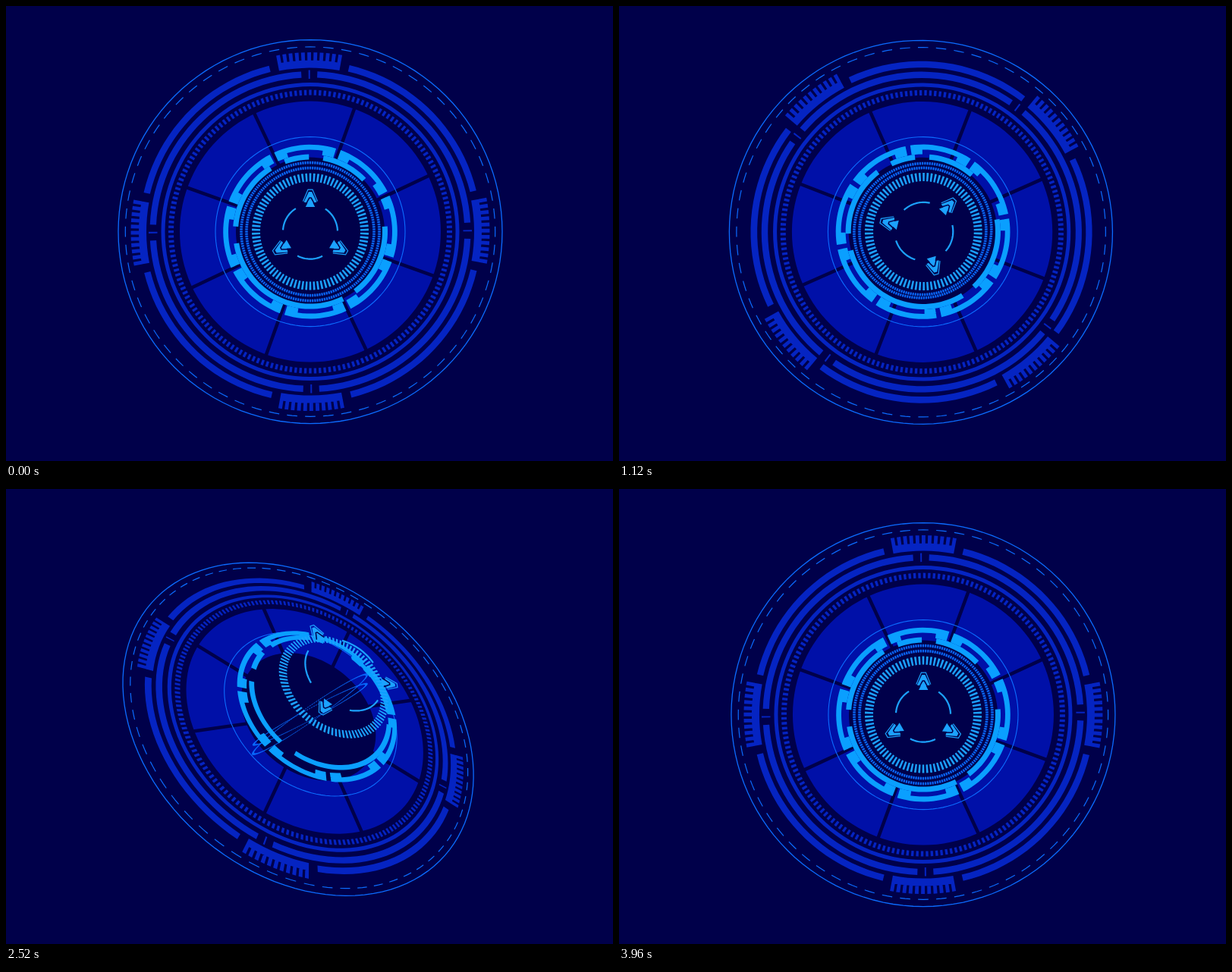
Animation, 800 px wide and 600 px high, one loop 4000 ms. Source, as an HTML page with a canvas:

```html
<!DOCTYPE html>
<html lang="en">
<head>
<meta charset="utf-8">
<title>Rotating dial</title>
<style>
html, body { margin: 0; width: 100%; height: 100%; overflow: hidden; background: #00004a; }
canvas { display: block; width: 800px; height: 600px; }
</style>
</head>
<body>
<canvas id="stage" width="800" height="600"></canvas>
<script>
const ctx = document.getElementById('stage').getContext('2d');
const LOOP = 4000, STEP = 40;
const CX = 401, CY = 297.6, DEPTH = 1300;
const BG = '#00004a', DISC = '#0010a8', BAND = '#0524c2', LINE = '#0c6cff',
      BRIGHT = '#0a9fff', TEETH = '#1ca2ff';
const RAD = Math.PI / 180;

// Key poses of the main turn: time, degrees
const TURN = [[0, 0], [1120, 51], [2040, 96.7], [2520, 118], [3120, 97.5], [LOOP, 0]];

// Smooth curve through the keys, at rest at both ends
function track(keys, t) {
  let i = 0;
  while (i < keys.length - 2 && t > keys[i + 1][0]) i++;
  const slope = k => k === 0 || k === keys.length - 1 ? 0
    : (keys[k + 1][1] - keys[k - 1][1]) / (keys[k + 1][0] - keys[k - 1][0]);
  const [t0, a] = keys[i], [t1, b] = keys[i + 1];
  const d = t1 - t0, u = (t - t0) / d, v = 1 - u;
  return a * (1 + 2 * u) * v * v + b * u * u * (3 - 2 * u)
    + d * u * v * (slope(i) * v - slope(i + 1) * u);
}

function ramp(t, from, to, power = 1) {
  const x = Math.max(0, Math.min(1, (t - from) / (to - from))) ** power;
  return x * x * (3 - 2 * x);
}

// Eases from 0 to 1, holds, and eases back
const hill = (t, up, top, leave, down = LOOP, power = 1) =>
  ramp(t, up, top, power) - ramp(t, leave, down);

// Maps a flat layer at height z through the tilt and the perspective
function plane(ax, ay, z = 0) {
  const ca = Math.cos(ax * RAD), sa = Math.sin(ax * RAD);
  const cb = Math.cos(ay * RAD), sb = Math.sin(ay * RAD);
  return (x, y) => {
    const py = y * ca - z * sa, pz = y * sa + z * ca;
    const s = DEPTH / (DEPTH + x * sb - pz * cb);
    return [CX + (x * cb + pz * sb) * s, CY + py * s];
  };
}

// Angles run clockwise from the top
const polar = (p, r, deg) => p(r * Math.sin(deg * RAD), -r * Math.cos(deg * RAD));

function poly(points, close = true) {
  points.forEach((q, i) => i ? ctx.lineTo(...q) : ctx.moveTo(...q));
  if (close) ctx.closePath();
}

function arcPoints(p, r, a, b) {
  const n = Math.max(1, Math.ceil(Math.abs(b - a) / 3));
  return Array.from({ length: n + 1 }, (_, i) => polar(p, r, a + (b - a) * i / n));
}

function band(p, r0, r1, a, b) {
  poly([...arcPoints(p, r1, a, b), ...arcPoints(p, r0, b, a)]);
}

function fill(color, draw) {
  ctx.beginPath();
  draw();
  ctx.fillStyle = color;
  ctx.fill();
}

function stroke(color, width, draw) {
  ctx.beginPath();
  draw();
  ctx.strokeStyle = color;
  ctx.lineWidth = width;
  ctx.stroke();
}

function circle(p, r, color, width) {
  stroke(color, width, () => poly(arcPoints(p, r, 0, 360)));
}

function ticks(p, r0, r1, n, duty, turn = 0) {
  const pitch = 360 / n;
  for (let i = 0; i < n; i++) {
    const a = turn + (i - duty / 2) * pitch;
    band(p, r0, r1, a, a + duty * pitch);
  }
}

function drawDial(p, turn, back) {
  circle(p, 253, LINE, 1.3);
  stroke(LINE, 1.2, () => {
    for (let a = 0; a < 360; a += 360 / 64) poly(arcPoints(p, 243.7, a - 1.6, a + 1.6), false);
  });
  fill(BAND, () => {
    for (let q = 0; q < 360; q += 90) {
      const a = turn + q - 0.35, b = back + q - 0.35;
      band(p, 216, 226, a - 10.6, a + 10.6);
      for (let i = -5; i <= 5; i++) band(p, 225.5, 236.5, a + i * 2 - 0.6, a + i * 2 + 0.6);
      band(p, 217, 225.5, a + 13.6, a + 76.4);
      band(p, 203.2, 211.5, b + 2.9, b + 87.1);
      band(p, 201.5, 213, b - 0.28, b + 0.28);
    }
    band(p, 191.5, 196.5, 0, 360);
    ticks(p, 180, 187, 180, 0.52, turn);
  });
  fill(DISC, () => band(p, 98, 172, 0, 360));
  stroke(BG, 4.5, () => {
    for (let q = 0; q < 360; q += 45) {
      const a = 19.7 + turn * 0.911 + q;
      poly([polar(p, 97, a), polar(p, 173.5, a)], false);
    }
  });
}

// Two thin tick rings that tumble on their own axes
function drawGyros(t) {
  const outer = plane(-55 * hill(t, 440, 2600, 3100), 80 * hill(t, 900, 2160, 2660));
  const inner = plane(-72 * hill(t, 700, 3100, 3100), 80 * hill(t, 900, 2160, 3120));
  const ring = (p, r, n) => {
    fill(LINE, () => ticks(p, r - 1.6, r + 1.6, n, 0.55));
    ctx.lineWidth = 0.4;
    ctx.strokeStyle = LINE;
    ctx.stroke();
  };
  ring(outer, 91, 180);
  ring(inner, 84, 168);
}

function drawBrackets(p, turn) {
  fill(BRIGHT, () => {
    for (let q = 0; q < 360; q += 45) {
      const a = turn + q + 20.5, b = a + 41.8;
      band(p, 108, 114.8, a, b);
      band(p, 102, 108.5, a, a + 8);
      band(p, 102, 108.5, b - 8.5, b);
    }
  });
}

function drawInnerArcs(p, turn) {
  fill(BRIGHT, () => {
    [[-20, -1], [10, 46], [86, 143], [154, 261], [274, 328]]
      .forEach(([a, b]) => band(p, 95, 102, turn + a, turn + b));
  });
}

function drawArrows(p, turn, spread) {
  stroke(TEETH, 2.2, () => {
    for (let q = 60; q < 360; q += 120) {
      poly(arcPoints(p, 36 * spread, turn + q - 26.5, turn + q + 28), false);
    }
  });
  const out = 44 * (spread - 1);
  for (let q = 0; q < 360; q += 120) {
    const c = Math.cos((turn + q) * RAD), s = Math.sin((turn + q) * RAD);
    // Points are mirrored: [half width, distance from the centre]
    const mirror = half => [...half, ...half.map(([x, y]) => [-x, y]).reverse()]
      .map(([x, y]) => p(x * c + (y + out) * s, x * s - (y + out) * c));
    stroke(TEETH, 1.2, () => poly(mirror([[9.5, 40], [3, 55.5]]), false));
    fill(TEETH, () => {
      poly(mirror([[4.5, 38], [8.5, 39], [2, 52.5], [-0.1, 52.5], [0, 45.5]].slice(0, 3).concat([[0, 52.5]])));
      poly(mirror([[6.2, 32.5], [1.5, 42]]));
    });
    stroke(BG, 1.5, () => poly(mirror([[6.5, 35], [1.2, 44.5]]), false));
  }
}

function draw(t) {
  const turn = track(TURN, t);
  const back = -147 * hill(t, 120, 2600, 2740);
  const lift = hill(t, 700, 2560, 2600);
  const tiltX = 31 * hill(t, 860, 2080, 2600, 3840, 1.5);
  const tiltY = 30 * hill(t, 860, 2060, 2800);
  const layer = z => plane(tiltX, tiltY, z * lift);

  ctx.fillStyle = BG;
  ctx.fillRect(0, 0, 800, 600);
  drawDial(layer(0), turn, back);
  circle(layer(10), 125, LINE, 1.1);
  drawGyros(t);
  drawBrackets(layer(28), turn * 0.31);
  drawInnerArcs(layer(36), -42 * lift);
  fill(TEETH, () => ticks(layer(72), 66, 77, 90, 0.5));
  drawArrows(layer(98), turn * 0.86, 1 + 0.48 * lift);
}

const start = performance.now();
function frame() {
  const t = Math.max(0, performance.now() - start) % LOOP;
  draw(Math.floor(t / STEP) * STEP);
  requestAnimationFrame(frame);
}
frame();
</script>
</body>
</html>
```
